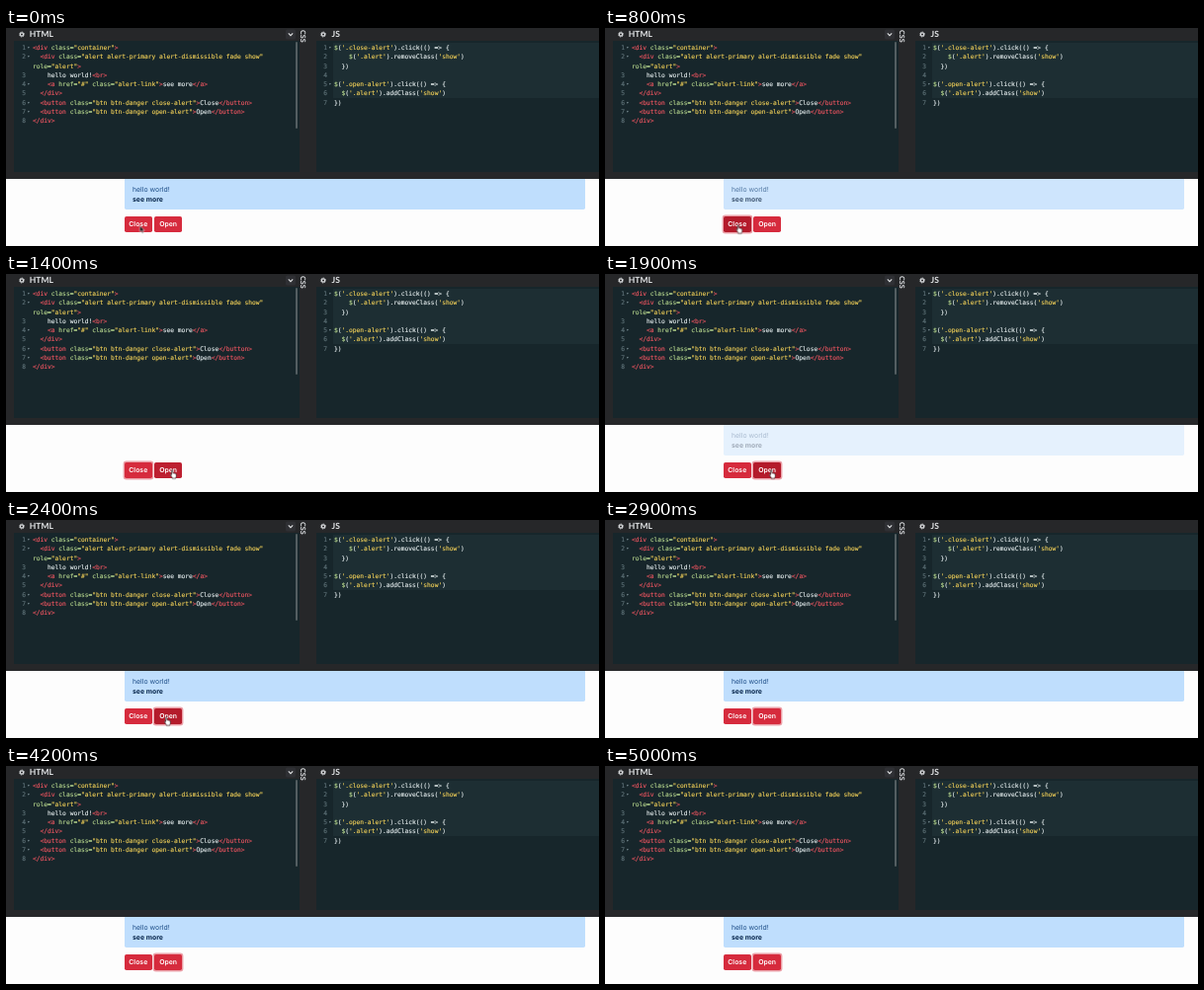
Write an HTML page that moves like this. It is 600 by 221 pixels and loops after 5.1 s.

```html
<!DOCTYPE html>
<html lang="en">
<head>
<meta charset="utf-8">
<title>Alert toggle</title>
<style>
  html, body { margin: 0; width: 100%; height: 100%; overflow: hidden; background: #fdfdfd; }
  #stage {
    position: relative; width: 600px; height: 221px; overflow: hidden;
    text-rendering: geometricPrecision; font: 6.9px/10.3px Inter, sans-serif;
  }
  #stage * { position: absolute; box-sizing: border-box; margin: 0; }
  #stage pre *, svg * { position: static; }

  /* Editors */
  .editors { width: 600px; height: 153px; background: #262729; }
  .pane { top: 13px; height: 133px; background: #17262b; }
  .html { left: 8px; width: 289px; }
  .js { left: 314px; width: 286px; }
  .selection { left: 331px; top: 15px; width: 269px; height: 56px; background: #1d2e33; }
  .thumb { left: 293px; top: 14px; width: 2px; height: 88px; border-radius: 1px; background: #535e61; }
  .title { top: 1.4px; font: bold 8.5px/11px Lato, sans-serif; color: #e4e6e8; }
  .css { left: 295px; top: 2px; width: 11px; writing-mode: vertical-rl; font-size: 7.2px; }
  .icons { width: 600px; height: 14px; }
  pre {
    top: 16px; font: 6.26px/9.25px "DejaVu Sans Mono", monospace; color: #e3ebec;
    -webkit-text-stroke: .15px currentColor;
  }
  .nums { width: 8px; text-align: right; color: #5f7278; }
  .folds { font-size: 4.5px; color: #82949a; }
  b { font-weight: normal; color: #ec5560; }
  i { font-style: normal; color: #b4d48c; }
  s { text-decoration: none; color: #f0cf58; }

  /* Preview */
  .alert {
    left: 119.5px; top: 153px; width: 466px; height: 31px; border-radius: 0 0 1.7px 1.7px;
    background: #bfdefd; color: #1b4c86; animation: fade 5.1s step-end infinite;
  }
  .alert span { left: 8.5px; top: 5.7px; white-space: nowrap; }
  .alert .link { top: 16px; font-weight: 700; color: #06254a; }
  .btn {
    top: 190.7px; width: 28.5px; height: 16.2px; border-radius: 1.8px; background: #d62b3d;
    color: #fff; font-weight: 600; line-height: 16.2px; text-align: center;
  }
  .close { left: 119.5px; animation: close 5.1s step-end infinite; }
  .open { left: 150.1px; width: 28px; animation: open 5.1s step-end infinite; }
  .cursor { left: 0; top: 0; width: 8px; height: 11px; overflow: visible; }
  .arrow { transform: translate(135.5px, 200.5px); animation: arrow 5.1s step-end infinite; }
  .hand { animation: hand 5.1s step-end infinite; }

  @keyframes fade {
    0% { opacity: 1; }
    15.68% { opacity: .76; }
    17.64% { opacity: .12; }
    19.6% { opacity: 0; }
    37.25% { opacity: .37; }
    39.21%, 100% { opacity: 1; }
  }
  @keyframes close {
    0% { background: #d62b3d; box-shadow: none; }
    1.96% { background: #bd2031; box-shadow: none; }
    13.72% { background: #b41b2b; box-shadow: 0 0 0 1.4px #eba0a8; }
    21.56% { background: #d62b3d; box-shadow: 0 0 0 1.4px #eba0a8; }
    35.29%, 100% { background: #d62b3d; box-shadow: none; }
  }
  @keyframes open {
    0% { background: #d62b3d; box-shadow: none; }
    23.52% { background: #bd2031; box-shadow: none; }
    35.29% { background: #b41b2b; box-shadow: 0 0 0 1.4px #eba0a8; }
    50.98%, 100% { background: #d62b3d; box-shadow: 0 0 0 1.4px #eba0a8; }
  }
  @keyframes arrow {
    0% { opacity: 1; }
    1.96%, 100% { opacity: 0; }
  }
  @keyframes hand {
    0% { opacity: 0; transform: translate(132.5px, 199.5px); }
    1.96% { opacity: 1; transform: translate(132.5px, 199.5px); }
    19.6% { opacity: 1; transform: translate(136px, 199.5px); }
    21.56% { opacity: 1; transform: translate(149px, 199px); }
    23.52% { opacity: 1; transform: translate(162px, 198.5px); }
    25.49% { opacity: 1; transform: translate(166px, 198.5px); }
    43.13% { opacity: 1; transform: translate(163px, 199px); }
    45.09% { opacity: 1; transform: translate(160px, 199.5px); }
    49.01% { opacity: 1; transform: translate(158px, 204px); }
    50.98%, 100% { opacity: 0; transform: translate(156px, 210px); }
  }
</style>
</head>
<body>
<div id="stage">
  <div class="editors">
    <div class="pane html"></div>
    <div class="pane js"></div>
    <div class="selection"></div>
    <div class="thumb"></div>
    <svg class="icons" viewBox="0 0 600 14">
      <g fill="none" stroke="#e0e2e4">
        <g id="gear">
          <circle cx="16" cy="6.5" r="1.6" stroke-width="1.2"/>
          <circle cx="16" cy="6.5" r="2.5" stroke-width=".8" stroke-dasharray="1 .96"/>
        </g>
        <use href="#gear" x="305"/>
        <rect x="283" y="1.5" width="10" height="10" rx="1.5" fill="#2f3034" stroke="none"/>
        <path d="M285.8 5.4l2.2 2.2 2.2-2.2" stroke-width="1.1"/>
      </g>
    </svg>
    <div class="title" style="left:23.8px">HTML</div>
    <div class="title css">CSS</div>
    <div class="title" style="left:329.5px">JS</div>

    <pre class="nums" style="left:12px">1
2

3
4
5
6
7
8</pre>
    <pre class="folds" style="left:21.5px">▾
▾


▾

▾
▾</pre>
    <pre style="left:27px"><b>&lt;div</b> <i>class=</i><s>"container"</s><b>&gt;</b>
  <b>&lt;div</b> <i>class=</i><s>"alert alert-primary alert-dismissible fade show"</s>
<i>role=</i><s>"alert"</s><b>&gt;</b>
    hello world!<b>&lt;br&gt;</b>
    <b>&lt;a</b> <i>href=</i><s>"#"</s> <i>class=</i><s>"alert-link"</s><b>&gt;</b>see more<b>&lt;/a&gt;</b>
  <b>&lt;/div&gt;</b>
  <b>&lt;button</b> <i>class=</i><s>"btn btn-danger close-alert"</s><b>&gt;</b>Close<b>&lt;/button&gt;</b>
  <b>&lt;button</b> <i>class=</i><s>"btn btn-danger open-alert"</s><b>&gt;</b>Open<b>&lt;/button&gt;</b>
<b>&lt;/div&gt;</b></pre>

    <pre class="nums" style="left:317px">1
2
3
4
5
6
7</pre>
    <pre class="folds" style="left:326.5px">▾



▾</pre>
    <pre style="left:332px"><i>$</i>(<s>'.close-alert'</s>).click(() =&gt; {
    <i>$</i>(<s>'.alert'</s>).removeClass(<s>'show'</s>)
  })

<i>$</i>(<s>'.open-alert'</s>).click(() =&gt; {
  <i>$</i>(<s>'.alert'</s>).addClass(<s>'show'</s>)
})</pre>
  </div>

  <div class="alert"><span>hello world!</span><span class="link">see more</span></div>
  <div class="btn close">Close</div>
  <div class="btn open">Open</div>

  <svg class="cursor arrow" viewBox="0 0 8 11">
    <path d="M0 0v6.4l1.5-1.3 1 2.3 1.1-.5-1-2.2h2z" fill="#111" stroke="#fff" stroke-width=".5"/>
  </svg>
  <svg class="cursor hand" viewBox="0 0 8 11">
    <path d="M1.6 5.2V1q0-.8.6-.8t.6.8v2.3q1.1-.4 1.3.3 1-.3 1.2.4 1-.2 1 .8v1.7q0 1-.7 1.6v.7H2.3v-.7L.4 5.5q-.2-.9.5-.9z"
      fill="#fff" stroke="#161616" stroke-width=".6" stroke-linejoin="round"/>
  </svg>
</div>
</body>
</html>
```
